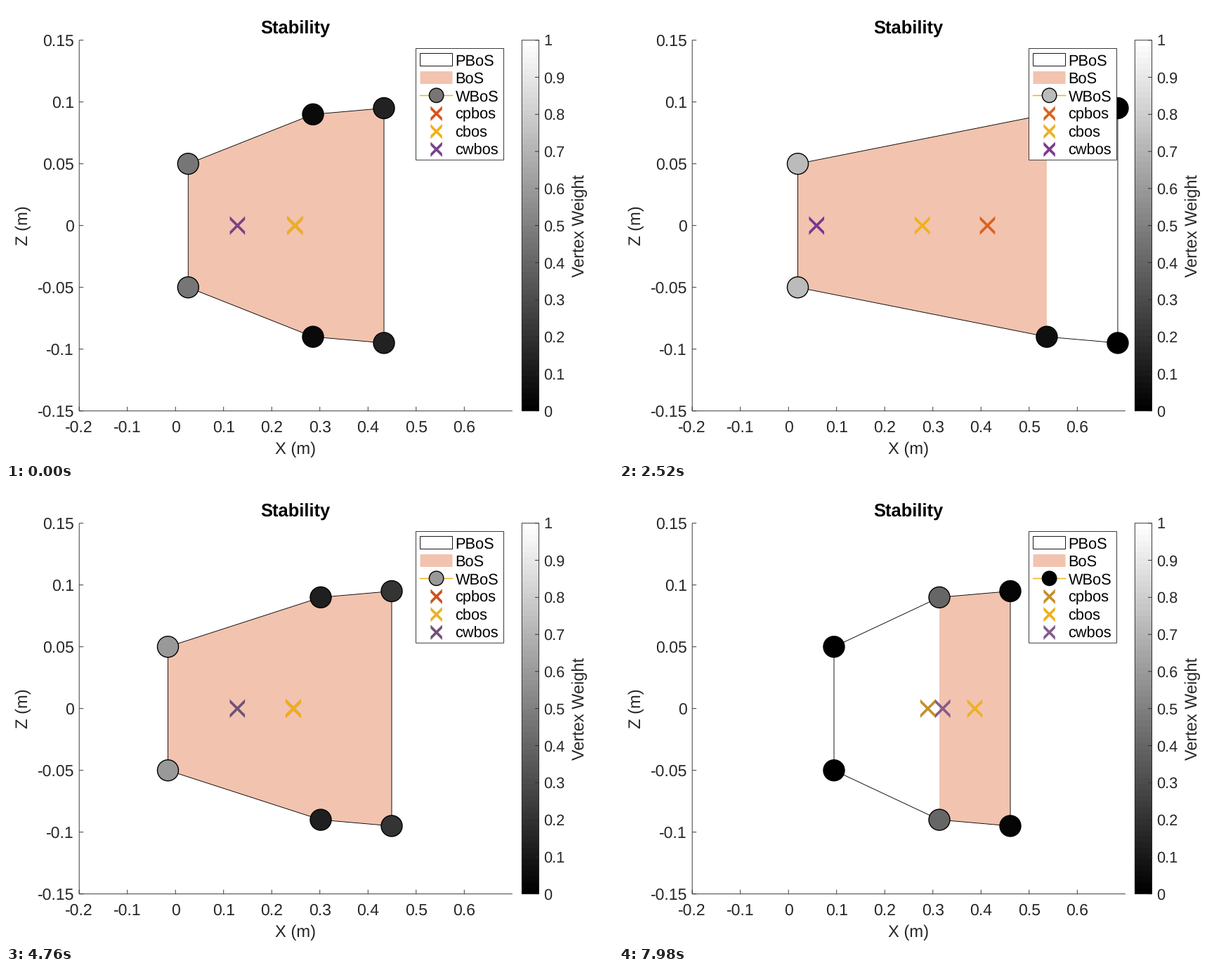
Write a matplotlib script that moves like this. It is 864 px wide and 648 px high and loops after 8000 ms.

```python
import numpy as np
import matplotlib.pyplot as plt
from matplotlib.animation import FuncAnimation
from matplotlib.collections import LineCollection
from matplotlib.colors import to_rgb
from matplotlib.patches import Circle, Polygon, Rectangle

plt.rcParams.update({
    "font.family": "Liberation Sans",
    "text.hinting": "no_hinting",
    "path.snap": False,
})

W, H = 864, 648
TICK_MS, STEP_MS, LOOP_MS = 20, 140, 8000
LEFT, RIGHT, TOP, BOTTOM = 104.2, 720.8, 48.7, 576.7
MID = (TOP + BOTTOM) / 2
BAR_L, BAR_R = 734.3, 758.5
INK, SKIN, GOLD = "#262626", "#f2c3af", "#edb120"
THIN = 0.9

fig = plt.figure(figsize=(W / 72, H / 72), dpi=72, facecolor="white")
ax = fig.add_axes([0, 0, 1, 1])
ax.axis("off")


def px(x):
    return LEFT + (x + 0.2) / 0.9 * (RIGHT - LEFT)


def py(z):
    return MID - z / 0.3 * (BOTTOM - TOP)


def label(x, y, s, size, ha="center", color=INK, **kw):
    ax.text(x, y, s, fontsize=size, ha=ha, va="baseline", color=color,
            rotation_mode="anchor", **kw)


def cross_shape(half, cut=2.6):
    """Outline of an X whose arms end in vertical cuts."""
    arm = np.array([(0, cut), (half, half + cut), (half, half - cut), (cut, 0)])
    side = np.vstack([arm, arm[::-1] * (1, -1)])
    return np.vstack([side, -side])


def cross(x, y, color, half, z):
    return ax.add_patch(Polygon(cross_shape(half) + (x, y), fc=color, ec="none", zorder=z))


def disc(x, y, r, z):
    return ax.add_patch(Circle((x, y), r, fc="k", ec="k", lw=1.4, zorder=z))


def box(x, y, w, h, z, fc="white", ec="k"):
    ax.add_patch(Rectangle((x, y), w, h, fc=fc, ec=ec, lw=THIN, zorder=z))


# Axes
lines = [[(LEFT, TOP), (LEFT, BOTTOM)], [(LEFT, BOTTOM), (RIGHT, BOTTOM)]]
for i in range(-2, 7):
    x = px(i / 10)
    lines.append([(x, BOTTOM), (x, BOTTOM - 6)])
    label(x, 606.5, f"{i / 10:g}", 23)
for i in range(-3, 4):
    y = py(i / 20)
    lines.append([(LEFT, y), (LEFT + 6, y)])
    label(97, y + 8.3, f"{i / 20:g}", 23, "right")

label(412, 40, "Stability", 25.5, color="k", weight="bold")
label(412, 638, "X (m)", 23.8)
label(31, MID, "Z (m)", 23.8, rotation=90)

# Colour bar
ax.imshow(np.linspace(1, 0, 64)[:, None], cmap="gray", vmin=0, vmax=1,
          extent=(BAR_L, BAR_R, BOTTOM, TOP), aspect="auto",
          interpolation="nearest", zorder=1)
ax.set_xlim(0, W)
ax.set_ylim(H, 0)
box(BAR_L, TOP, BAR_R - BAR_L, BOTTOM - TOP, 2, fc="none", ec=INK)
for i in range(11):
    y = BOTTOM - i / 10 * (BOTTOM - TOP)
    lines.append([(BAR_R - 5.5, y), (BAR_R, y)])
    label(765.5, y + 7.8, f"{i / 10:g}", 21.8, "left")
label(823, MID, "Vertex Weight", 23.5, rotation=90)
ax.add_collection(LineCollection(lines, colors=INK, linewidths=THIN, zorder=3))

# Moving parts
base = ax.add_patch(Polygon([(0, 0)] * 3, fc=SKIN, ec="none", zorder=4))
outline = ax.add_patch(Polygon([(0, 0)] * 3, fill=False, ec="k", lw=THIN, zorder=5))
Z_POS = (0.05, 0.09, 0.095)
pairs = [[disc(0, py(s * z), 15, 6) for s in (1, -1)] for z in Z_POS]
BIG = 10.8
cp, cb, cw = (cross(0, MID, GOLD, BIG, z) for z in (7, 8, 9))

# Legend
box(583.5, 60.5, 125, 158.8, 10, ec=INK)
box(589.5, 67.5, 46, 18, 11)
box(589.5, 93, 46, 18, 11, fc=SKIN, ec="none")
ax.plot([589.5, 635.5], [127.5, 127.5], color=GOLD, lw=1.5, zorder=11)
key_disc = disc(612.6, 127.3, 10.2, 12)
key_cp, _, key_cw = (cross(612.6, 153.2 + 25.5 * i, GOLD, 8.2, 12) for i in range(3))
for i, s in enumerate(["PBoS", "BoS", "WBoS", "cpbos", "cbos", "cwbos"]):
    label(639.5, 84.3 + 25.5 * i, s, 21.8, "left", "k", zorder=12)

# Motion keys: times in ms, positions in pixels
HEEL_T = [0, 980, 1680, 2240, 2520, 3360, 4480, 4760, 5250, 6160, 6720, 7980]
HEEL_X = [259.3, 269, 261, 256, 254.5, 260, 240, 230.5, 221, 244, 252, 306]
TOE_T = [0, 980, 1680, 2240, 2450, 3360, 4480, 4760, 6160, 7980]
TOE_X = [538, 556.3, 645.3, 699, 718, 613.3, 555, 549, 554.7, 557]
BALL_GAP = 101
KEY_T = [0, 980, 1680, 3360, 4760, 6160, 7980]
WEIGHTS = [
    [0.463, 0.30, 0.53, 0.94, 0.60, 0, 0],
    [0.04, 0, 0.12, 0, 0.12, 0.73, 0.40],
    [0.135, 0, 0, 0, 0.205, 0.01, 0.02],
]
CP_COLORS = ["#d4541e", "#d95319", "#d95319", "#dd7020", "#d0501a", "#df962a", "#c4902c"]
CW_COLORS = ["#78428a", "#7a2f8e", "#823c8c", "#7a2f8e", "#715078", "#7d6a82", "#845c8c"]


def blend(t, colors):
    return [np.interp(t, KEY_T, ch) for ch in zip(*map(to_rgb, colors))]


def contact(t):
    """Vertex pairs that touch the ground: 0 heel, 1 ball, 2 toe."""
    if 490 <= t < 2600:
        return [0, 1]
    return [1, 2] if t >= 5460 else [0, 1, 2]


def ring(xs, ids):
    upper = [(xs[i], py(Z_POS[i])) for i in ids]
    lower = [(xs[i], py(-Z_POS[i])) for i in reversed(ids)]
    return upper + lower


def update(frame):
    t = frame * TICK_MS // STEP_MS * STEP_MS
    toe = np.interp(t, TOE_T, TOE_X)
    xs = np.array([np.interp(t, HEEL_T, HEEL_X), toe - BALL_GAP, toe])
    w = np.array([np.interp(t, KEY_T, row) for row in WEIGHTS])
    ids = contact(t)

    outline.set_xy(ring(xs, [0, 1, 2]))
    base.set_xy(ring(xs, ids))
    for pair, z, x, v in zip(pairs, Z_POS, xs, w):
        for d, y in zip(pair, (py(z), py(-z))):
            d.set_center((x, y))
            d.set_facecolor((v, v, v))
    key_disc.set_facecolor((w[0],) * 3)

    for mark, x in ((cp, xs.mean()), (cb, xs[ids].mean()), (cw, xs @ w / w.sum())):
        mark.set_xy(cross_shape(BIG) + (x, MID))
    for mark in (cp, key_cp):
        mark.set_facecolor(blend(t, CP_COLORS))
    for mark in (cw, key_cw):
        mark.set_facecolor(blend(t, CW_COLORS))
    return [base, outline, *sum(pairs, []), cp, cb, cw, key_disc, key_cp, key_cw]


anim = FuncAnimation(fig, update, frames=LOOP_MS // TICK_MS, interval=TICK_MS,
                     repeat=True, repeat_delay=0)
plt.show()
```
